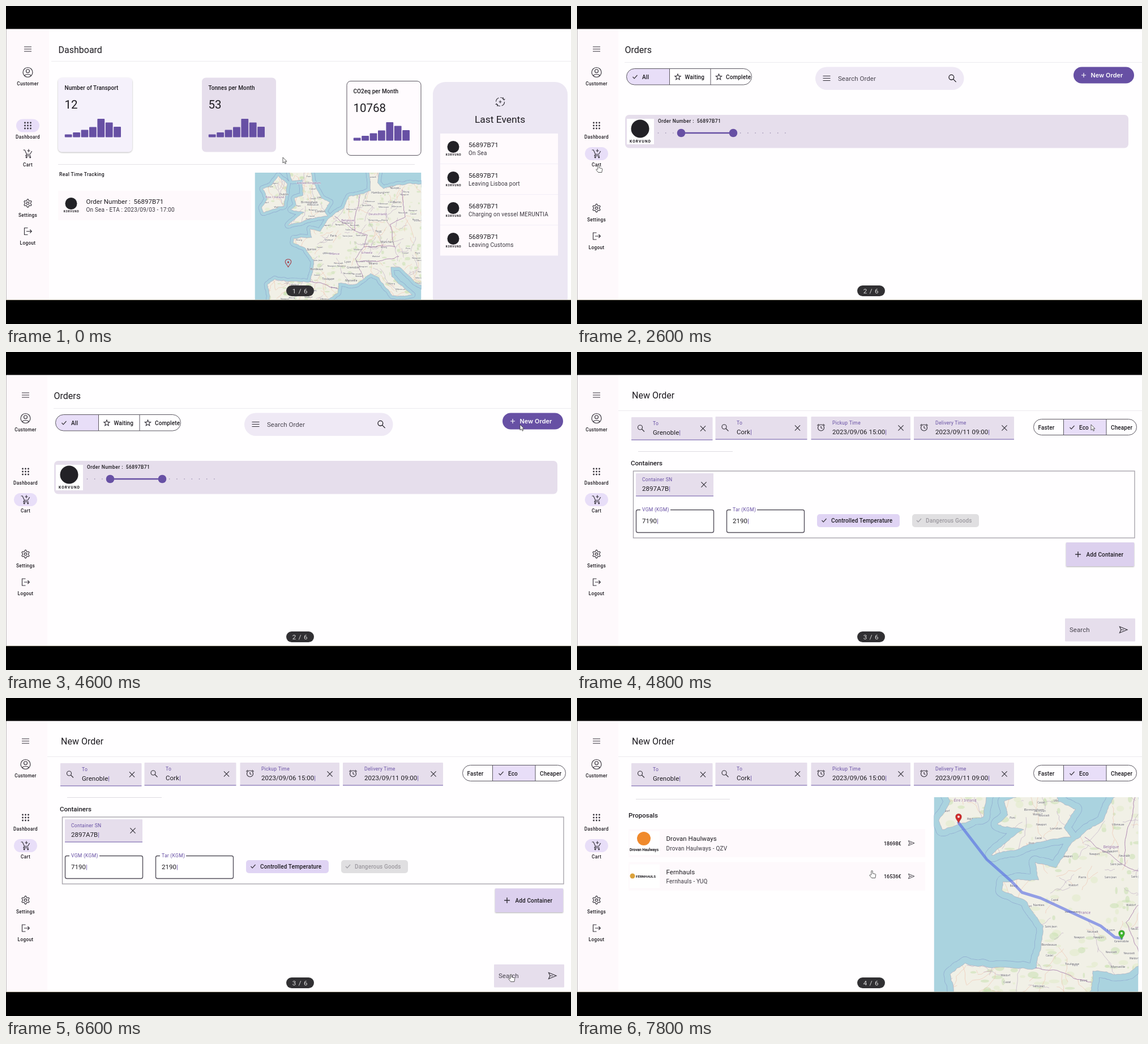
An HTML page for the animation above (8000 ms loop, 998 px wide and 561 px high).

```html
<!DOCTYPE html>
<html lang="en">
<head>
<meta charset="utf-8">
<title>Transport dashboard</title>
<style>
html, body { margin: 0; width: 100%; height: 100%; overflow: hidden; background: #000; }
svg { display: block; width: 100vw; height: 100vh; }
text { font-family: Roboto, sans-serif; fill: #1d1b20; white-space: pre; }
.title { font-size: 16px; }
.num { font-size: 20.5px; }
.head { font-size: 17.4px; }
.body { font-size: 11.5px; letter-spacing: .04px; }
.sub { font-size: 10px; letter-spacing: .18px; fill: #3a373f; }
.card { font-size: 10px; font-weight: 500; letter-spacing: .08px; }
.btn { font-size: 10px; font-weight: 500; letter-spacing: .12px; }
.lab { font-size: 8.6px; font-weight: 500; letter-spacing: .36px; }
.nav { font-size: 8.2px; font-weight: 500; letter-spacing: .35px; text-anchor: middle; }
.hint { font-size: 8.6px; letter-spacing: .25px; fill: #6750a4; }
.sec { font-size: 11.5px; font-weight: 500; }
.price { font-size: 9px; font-weight: 500; }
.cta { font: 600 10.8px Inter, sans-serif; letter-spacing: .1px; fill: #fff; }
.badge { font-size: 11.5px; letter-spacing: .8px; text-anchor: middle; fill: #ddd; }
.mark { font-weight: 700; text-anchor: middle; }
.soft { fill: #49454f; }
.off { fill: #9d9aa0; }
.town, .state { font-family: "Noto Sans", sans-serif; text-anchor: middle; paint-order: stroke; stroke: #fff; stroke-opacity: .6; stroke-width: 1px; fill: #5c5a60; }
.state { fill: #8c6596; }
.icon { fill: none; stroke: #35323a; stroke-width: 1.15; }
.dot { fill: #35323a; stroke: none; }
.page, .cur { visibility: hidden; animation: 8s step-end infinite; }
#p1 { animation-name: p1; }
#p2 { animation-name: p2; }
#p3 { animation-name: p3; }
#p4 { animation-name: p4; }
#arrow { animation-name: arrow; }
#hand { animation-name: hand; }
#cursor { animation: move 8s linear infinite; }
@keyframes p1 { 0% { visibility: visible } 32.5%, 100% { visibility: hidden } }
@keyframes p2 { 0% { visibility: hidden } 32.5% { visibility: visible } 60%, 100% { visibility: hidden } }
@keyframes p3 { 0% { visibility: hidden } 60% { visibility: visible } 85%, 100% { visibility: hidden } }
@keyframes p4 { 0% { visibility: hidden } 85%, 100% { visibility: visible } }
@keyframes arrow {
  0% { visibility: visible } 22.5% { visibility: hidden } 37.5% { visibility: visible }
  80% { visibility: hidden } 87.5% { visibility: visible } 95%, 100% { visibility: hidden }
}
@keyframes hand {
  0% { visibility: hidden } 22.5% { visibility: visible } 37.5% { visibility: hidden }
  80% { visibility: visible } 87.5% { visibility: hidden } 95%, 100% { visibility: visible }
}
@keyframes move {
  0% { transform: translate(489px, 267px) }
  12.5% { transform: translate(489px, 267px); animation-timing-function: steps(6, jump-start) }
  27.5% { transform: translate(38px, 281px) }
  37.5% { transform: translate(38px, 281px); animation-timing-function: steps(7, jump-start) }
  55% { transform: translate(908px, 128px) }
  62.5% { transform: translate(908px, 128px); animation-timing-function: steps(9, jump-start) }
  85% { transform: translate(892px, 488px) }
  87.5% { transform: translate(892px, 488px); animation-timing-function: steps(5, jump-start) }
  100% { transform: translate(521px, 305px) }
}
</style>
</head>
<body>
<svg viewBox="0 0 998 561" preserveAspectRatio="none">
  <defs>
    <filter id="shadow" x="-10%" y="-10%" width="120%" height="125%">
      <feDropShadow dx="0" dy="1" stdDeviation="1" flood-color="#000" flood-opacity=".32"/>
    </filter>
    <path id="menu" d="M-6.5-4h13M-6.5 0h13M-6.5 4h13"/>
    <g id="user"><circle r="8.5"/><circle cy="-2.3" r="3"/><path d="M-5.8 6C-4 2.6 4 2.6 5.8 6"/></g>
    <g id="cart"><path d="M-8-6.5h2.6l3.4 7.5h6l3.2-5.5M-2 1l-1.6 2.6h8.8M1.5-8v5.5M-1-5.3h5"/><circle cx="-2.3" cy="6.3" r="1"/><circle cx="4.2" cy="6.3" r="1"/></g>
    <g id="gear"><circle r="2.2"/><path id="teeth"/></g>
    <path id="exit" d="M0-6h-6v12h6M-2.5 0h9M3.8-3l3 3-3 3"/>
    <path id="star" d="M0-5l1.4 3.4 3.7.3-2.8 2.4.9 3.6L0 2.8l-3.2 1.9.9-3.6-2.8-2.4 3.7-.3Z"/>
    <path id="find" d="M2.5-1.5a4 4 0 1 0-8 0a4 4 0 1 0 8 0M1.5 1.5L6 6"/>
    <path id="close" d="M-4.6-4.6l9.2 9.2m0-9.2l-9.2 9.2"/>
    <g id="clock"><circle r="5.5"/><path d="M0-3v3.2l2.4 1.4M-6.6-3.8l3-2.6M6.6-3.8l-3-2.6"/></g>
    <path id="plus" d="M-4 0h8M0-4v8"/>
    <path id="check" d="M-4 0l2.7 2.8L4-3"/>
    <path id="send" d="M-6.5-5.5L7 0-6.5 5.5-4 0ZM-4 0h5"/>
    <g id="sync"><circle r="7.5" stroke-dasharray="9 2.78"/><path d="M-2.5 0h5M0-2.5v5M5-8v3.5h3.5M-5 8v-3.5h-3.5"/></g>
    <path id="pin" d="M0 0C-1-5-5.5-7.5-5.5-12a5.5 5.5 0 0 1 11 0C5.5-7.5 1-5 0 0Z"/>
  </defs>
  <path fill="#fffeff" d="M.5 40.5H998V518H.5Z"/>
  <path fill="#e6e0c8" d="M0 518h998v.8H0Z"/>
  <g id="p1" class="page"></g>
  <g id="p2" class="page"></g>
  <g id="p3" class="page"></g>
  <g id="p4" class="page"></g>
  <g id="cursor" stroke="#333" stroke-width=".8" fill="#fff" stroke-linejoin="round">
    <path id="arrow" class="cur" d="M0 0V10L2.4 7.8 4 11.3 5.6 10.6 4.2 7.2H7Z"/>
    <path id="hand" class="cur" d="M-1.2 7V.8a1.2 1.2 0 0 1 2.4 0V4.5l4.6 1c.8.2 1 .8.9 1.5L5.8 12.5H-.5L-4 8.2c-.6-.9.6-1.7 1.4-1Z"/>
  </g>
</svg>
<script>
const text = (x, y, cls, s, size) =>
  `<text x="${x}" y="${y}" class="${cls}"${size ? ` style="font-size:${size}px"` : ''}>${s}</text>`;
const icon = (id, x, y, scale = 1, color = '#35323a') =>
  `<use href="#${id}" class="icon" style="stroke:${color}" transform="translate(${x} ${y}) scale(${scale})"/>`;
const rect = (x, y, w, h, fill, r = 0, more = '') =>
  `<rect x="${x}" y="${y}" width="${w}" height="${h}" rx="${r}" fill="${fill}" ${more}/>`;
const circle = (x, y, r, fill) => `<circle cx="${x}" cy="${y}" r="${r}" fill="${fill}"/>`;
const line = (x1, x2, y, color = '#eceaee') => `<path d="M${x1} ${y}H${x2}" stroke="${color}"/>`;
const stroke = (d, color, width, more = '') =>
  `<path d="${d}" fill="none" stroke="${color}" stroke-width="${width}" stroke-linejoin="round" ${more}/>`;
const repeat = (n, draw) => Array.from({ length: n }, (_, i) => draw(i)).join('');
const DARK = '#222126', LILAC = '#e6deec', PILL = '#e8def8', VIOLET = '#6750a4';

teeth.setAttribute('d', 'M' + Array.from({ length: 48 }, (_, i) => {
  const a = i * Math.PI / 24, r = 6 + 1.1 * Math.tanh(3 * Math.cos(6 * a));
  return (r * Math.sin(a)).toFixed(2) + ' ' + (-r * Math.cos(a)).toFixed(2);
}).join('L') + 'Z');

const logo = (x, y, r, size) => circle(x, y, r, DARK) +
  `<text x="${x + .5}" y="${y + r * 1.5}" class="mark" style="font-size:${size}px;letter-spacing:${size / 6}px">KORVUND</text>`;
const badge = n => rect(495, 493, 49, 19, '#313033', 9.5) + text(519.5, 507, 'badge', n + ' / 6');

function sidebar(width, x, active, low) {
  const dots = repeat(9, i => `<circle class="dot" cx="${x + (i % 3 - 1) * 5}" cy="${206 + Math.floor(i / 3) * 5}" r="1.4"/>`);
  return rect(.5, 41, width - .5, 477, '#fef9fc') + icon('menu', x, 76)
    + rect(x - 20.5, active - 11.5, 41, 23, PILL, 11.5)
    + icon('user', x, 117) + dots + icon('cart', x, 260.5) + icon('gear', x, low) + icon('exit', x, low + 49.5)
    + text(x, 140, 'nav', 'Customer') + text(x, 234, 'nav', 'Dashboard') + text(x, 283, 'nav', 'Cart')
    + text(x, low + 23.5, 'nav', 'Settings') + text(x, low + 72.5, 'nav', 'Logout');
}

// Seeded noise
let seed = 7;
const rnd = () => (seed = seed * 16807 % 2147483647) / 2147483647;
const rough = (pts, depth = 4, amount = .13) => depth ? rough(pts.flatMap((p, i) => {
  if (!i) return [p];
  const q = pts[i - 1], n = (rnd() - .5) * amount * 2;
  return [[(p[0] + q[0] - (p[1] - q[1]) * n) / 2, (p[1] + q[1] + (p[0] - q[0]) * n * .6) / 2], p];
}), depth - 1, amount * 1.3) : pts;

// Key points of coasts and borders as longitude and latitude
const parse = s => s.split(',').map(p => p.split(' ').map(Number));
const ring = s => { const p = parse(s); return rough([...p, p[0]]); };
const atlantic = '-8.7 40,-9.2 43,-7.9 43.7,-1.7 43.4,-1.1 46,-2.5 47.4,-4.7 48.1,-4.6 48.6,-1.5 48.7,-1.8 49.7,0 49.4,1.6 50.9,4.2 52.1,5 53.2,8.8 53.8,8.2 57,10.4 57,10 54.6,11 54,18.5 54.6';
const inland = '18.5 42.6,13.7 45.2,12.3 45.2,12.5 44,16 41.7,12.5 41.6,10.2 43.9,8.8 44.4,6.4 43.1,3.2 43.2,3.1 42,.6 40.6';
const britain = '-5.6 50.1,-3.4 50.4,1.3 51.1,.7 51.6,1.7 52.6,.2 53,-1.3 54.7,-2 57,-6 57,-4.9 54.8,-3.1 54.9,-3 53.3,-4.5 53,-4.2 52.3,-5.1 51.8,-2.8 51.5';
const ireland = '-9.9 51.5,-6.3 52.2,-5.7 54.5,-7.3 55.3,-8.6 54.3,-10 54,-9.2 53,-10.2 52';
const coasts = [atlantic + ',' + inland, britain, ireland].map(ring);
const borders = [
  '-1.8 43.4,3.1 42.5', '2.5 51.1,6 49.5,8.2 49,7.6 47.6,6.1 46.2,7.5 43.8', '6.9 53.4,6 50.8,6 49.5',
  '7.6 47.6,13 47.6,12.2 50.2,14.8 51,14.3 53.9', '6.9 45.9,13.7 46.5'
].map(s => rough(parse(s)));
const towns = 'Dublin -6.3 53.3,Birmingham -1.9 52.5,London 0 51.5,Nantes -1.5 47.2,Paris 2.3 48.8,Bordeaux -.6 44.8,Toulouse 1.4 43.6,Lyon 4.8 45.7,Grenoble 5.7 45,Marseille 5.4 43.4,Hamburg 10 53.5,Berlin 13.4 52.5,München 11.6 48.1,Milano 9.2 45.5';
const states = 'Éire / Ireland -7.9 53,United Kingdom -2 54.5,France 2.5 46.7,Belgique 4.8 50.5,Deutschland 10 51.2,Schweiz 8.1 46.8';
const villages = ['Bourg', 'Neustadt', 'Villeneuve', 'Newport', 'Pont', 'Castel', 'Saint-Jean', 'Waldorf'];
const merc = lat => Math.log(Math.tan(Math.PI / 4 + lat * Math.PI / 360)) * 180 / Math.PI;
const somewhere = () => [rnd() * 29 - 11, 41 + rnd() * 15];

function map(id, k, x0, y0, box) {
  seed = 99;
  const at = ([lon, lat]) => [x0 + k * lon, y0 - k * merc(lat)].map(v => v.toFixed(1));
  const path = pts => 'M' + pts.map(p => at(p).join(' ')).join('L');
  const land = coasts.map(p => path(p) + 'Z').join('');
  const label = (name, pos, cls, size) => text(...at(pos), cls, name, size);
  const labels = (list, cls, size) => list.split(',').map(s => {
    const [, name, lon, lat] = s.match(/^(.*) (\S+) (\S+)$/);
    return label(name, [+lon, +lat], cls, size);
  }).join('');
  const woods = repeat(500, () => {
    const [x, y] = at(somewhere());
    const rx = k * (.08 + rnd() * .4), ry = k * (.08 + rnd() * .25);
    return `<ellipse cx="${x}" cy="${y}" rx="${rx.toFixed(1)}" ry="${ry.toFixed(1)}" fill="${rnd() < .5 ? '#c6dfae' : '#dfebc8'}" opacity=".5"/>`;
  });
  const walks = (n, reach) => repeat(n, () => {
    const [lon, lat] = somewhere();
    return path(rough([[lon, lat], [lon + (rnd() - .5) * reach, lat + (rnd() - .5) * reach]], 3, .3));
  });
  const size = 4 + k * .1;
  return `<clipPath id="${id}">${rect(...box)}</clipPath><clipPath id="${id}land"><path d="${land}"/></clipPath>
    <g clip-path="url(#${id})">` + rect(...box, '#aad3df')
    + stroke(land, '#8fa9cf', k * 1.15) + stroke(land, '#aad3df', k * 1.15 - 1.4)
    + `<path d="${land}" fill="#f1f0e6"/><g clip-path="url(#${id}land)">${woods}`
    + stroke(walks(130, 5), '#eebda8', .7, 'opacity=".8"') + stroke(walks(110, 4), '#bba6c2', .6)
    + repeat(150, i => label(villages[i % villages.length], somewhere(), 'town', size * .75)) + '</g>'
    + stroke(land, '#a7a3b8', .6) + stroke(borders.map(path).join(''), '#b08bb3', 1)
    + labels(towns, 'town', size) + labels(states, 'state', size * 1.1) + '</g>';
}

// Dashboard
const heights = [5, 8.5, 13, 18, 32.5, 26, 18.5];
const stat = (x, y, fill, more, label, value) => rect(x, y, 131, 131, fill, 7, more)
  + text(x + 11.5, y + 21, 'card', label) + text(x + 11.5, y + 54.5, 'num', value)
  + repeat(7, i => rect((x + 11.8 + i * 14.4).toFixed(1), y + 105 - heights[i], 12.8, heights[i], VIOLET, 1));
const events = ['On Sea', 'Leaving Lisboa port', 'Charging on vessel MERUNTIA', 'Leaving Customs'];
p1.innerHTML = sidebar(76, 38.5, 211, 348) + text(92.5, 82.5, 'title', 'Dashboard') + line(80, 998, 97.5)
  + stat(92, 126.5, '#f5f1fb', 'filter="url(#shadow)"', 'Number of Transport', '12')
  + stat(346, 126.5, LILAC, '', 'Tonnes per Month', '53')
  + stat(602, 132.5, '#fffbfe', 'stroke="#5a5660"', 'CO2eq per Month', '10768')
  + line(92, 722, 279.5, '#e4e1e7') + text(94, 299.5, 'lab', 'Real Time Tracking')
  + rect(92, 326, 341, 52, '#fef9fc') + logo(115, 348.5, 10.5, 4.8)
  + text(141.5, 349, 'body', 'Order Number :  56897B71') + text(141.5, 362.5, 'sub', 'On Sea - ETA : 2023/09/03 - 17:00')
  + map('m1', 10.15, 555, 976, [439.5, 294, 294, 224])
  + '<use href="#pin" transform="translate(498.5 461) scale(.95 .82)" fill="none" stroke="#a8404a" stroke-width="1.2"/>'
  + circle(498.5, 452, 1.7, '#a8404a')
  + '<path d="M754 518V156a22 22 0 0 1 22-22H970a22 22 0 0 1 22 22V518Z" fill="#ece7f3"/>'
  + icon('sync', 873, 169) + text(828, 206.2, 'head', 'Last Events')
  + repeat(4, i => {
    const y = 225 + i * 54;
    return rect(767, y, 208, 53.3, '#fffafd') + logo(790, y + 23.5, 10.5, 4.8)
      + text(817, y + 24, 'body', '56897B71') + text(817, y + 37.5, 'sub', events[i]);
  }) + badge(1);

// Orders
const side = sidebar(73, 34.5, 260.5, 356.5);
const frame = 'stroke="#5a5660"';
p2.innerHTML = side + text(84.5, 82.5, 'title', 'Orders') + line(84, 998, 99.5)
  + `<path d="M163.5 110.5H102a14.2 14.2 0 0 0 0 28.5h61.5Z" fill="${PILL}"/>`
  + rect(87.5, 110.5, 221, 28.5, 'none', 14.2, frame) + `<path d="M163.5 110.5v28.5m72.5-28.5v28.5" ${frame}/>`
  + icon('check', 102.5, 125) + text(115, 128.5, 'btn', 'All') + icon('star', 178, 125) + text(190.5, 128.5, 'btn', 'Waiting')
  + icon('star', 250.5, 125) + text(263, 128.5, 'btn', 'Complete')
  + rect(421, 107.5, 262.5, 40.5, '#efe9f5', 20.2) + icon('menu', 441, 127.5) + text(461, 131.5, 'body soft', 'Search Order')
  + icon('find', 663, 127.5, 1.1, '#1d1b20')
  + rect(877, 107.5, 107, 29, VIOLET, 14.5) + icon('plus', 895, 122, 1, '#fff') + text(907.5, 125.5, 'cta', 'New Order')
  + rect(85, 192, 889, 58.5, LILAC, 7) + rect(88, 199, 48, 45, '#fff') + logo(111.5, 216.5, 16, 6.6)
  + text(143, 206, 'lab', 'Order Number :  56897B71')
  + repeat(18, i => circle((143.5 + i * 13.2).toFixed(1), 224, .8, '#8f84a6'))
  + stroke('M184 224H276', VIOLET, 2.6) + circle(184, 224, 7.3, VIOLET) + circle(276, 224, 7.3, VIOLET)
  + badge(2);

// New order
const caret = '<tspan fill="#6750a4">|</tspan>';
const field = (x, y, w, dx, label, value) => rect(x, y, w, 40.5, LILAC, 1) + line(x, x + w, y + 40, '#6f5ba8')
  + text(x + dx, y + 14, 'hint', label) + text(x + dx, y + 31, 'body', value + caret) + icon('close', x + w - 17, y + 20);
const form = side + text(97, 82, 'title', 'New Order') + line(73, 998, 103.5)
  + field(96, 115, 143.5, 38, 'To', 'Grenoble') + icon('find', 113, 134.5)
  + field(244.5, 114, 162, 37.5, 'To', 'Cork') + icon('find', 261.5, 133.5)
  + field(413.5, 114, 175.5, 37.5, 'Pickup Time', '2023/09/06 15:00') + icon('clock', 431, 133.5)
  + field(595, 114, 177, 38, 'Delivery Time', '2023/09/11 09:00') + icon('clock', 613, 133.5)
  + rect(859.5, 118.5, 75.5, 28, PILL) + rect(806.5, 118.5, 182, 28, 'none', 14, frame) + `<path d="M859.5 118.5v28m75.5-28v28" ${frame}/>`
  + text(814.5, 136.5, 'btn', 'Faster') + icon('check', 874.5, 133) + text(887, 136.5, 'btn', 'Eco') + text(943, 136.5, 'btn', 'Cheaper');
const outlined = (x, gap, label, value) => rect(x + .5, 278.5, 137, 40, '#fff', 3, 'stroke="#55515c" stroke-width="1.4"')
  + rect(x + 8, 276, gap, 5, '#fffeff') + text(x + 11, 281, 'hint', label) + text(x + 11, 302, 'body', value + caret);
p3.innerHTML = form + line(108, 275, 175.5, '#dedbe1') + text(95, 199.5, 'sec', 'Containers')
  + rect(99.5, 210, 885.5, 118, 'none', 0, 'stroke="#a19ea6" stroke-width="1.3"')
  + field(104, 214, 137, 11, 'Container SN', '2897A7B')
  + outlined(104, 53, 'VGM (KGM)', '7190') + outlined(264, 46, 'Tar (KGM)', '2190')
  + rect(424, 286, 146, 23, '#e0d4f4', 5) + icon('check', 436.5, 297) + text(449, 300.5, 'btn', 'Controlled Temperature')
  + rect(592, 286, 118, 23, '#e0dfe1', 5) + icon('check', 604, 297, 1, '#9d9aa0') + text(616, 300.5, 'btn off', 'Dangerous Goods')
  + rect(864, 336, 120, 42, '#dcd0ee', 1, 'filter="url(#shadow)"') + icon('plus', 885, 357, 1.25) + text(899.5, 360.5, 'btn', 'Add Container')
  + rect(862, 470, 124, 40.5, LILAC, 1) + text(870, 494, 'body soft', 'Search') + icon('send', 965, 490)
  + badge(3);

// Proposals
const offer = (y, name, sub, price) => rect(91, y, 524, 50, '#fef9fc') + rect(93, y + 4, 53, 42, '#fff')
  + text(157.5, y + 21, 'body', name) + text(157.5, y + 37.5, 'sub', sub)
  + text(542, y + 28.5, 'price', price) + icon('send', 590.5, y + 25, .78);
const marker = (x, y, color) => `<use href="#pin" transform="translate(${x} ${y})" fill="${color}" stroke="#555" stroke-opacity=".4" stroke-width=".6"/>`
  + circle(x, y - 12, 1.9, '#fff');
p4.innerHTML = form + line(104, 270, 178.5, '#dedbe1') + text(91, 211, 'sec', 'Proposals')
  + offer(231, 'Drovan Haulways', 'Drovan Haulways - QZV', '18698€') + offer(289.5, 'Fernhauls', 'Fernhauls - YUQ', '16536€')
  + circle(118, 248, 12, '#f08a2c') + text(118.5, 269.5, 'mark', 'Drovan Haulways', 6.6)
  + circle(98, 314, 4.5, '#dba23c') + text(121.5, 316.5, 'mark', 'FERNHAULS', 6.2)
  + map('m2', 20.3, 846, 1456, [630.5, 175, 361, 343])
  + stroke('M674 220L724 285 767 323 786 343 819 353 888 385 925 402 950 422 962 424', '#5468e4', 5, 'stroke-opacity=".6" stroke-linecap="round"')
  + marker(674, 221.5, '#cf2b2b') + marker(962, 427, '#3fb42f') + badge(4);
</script>
</body>
</html>
```
